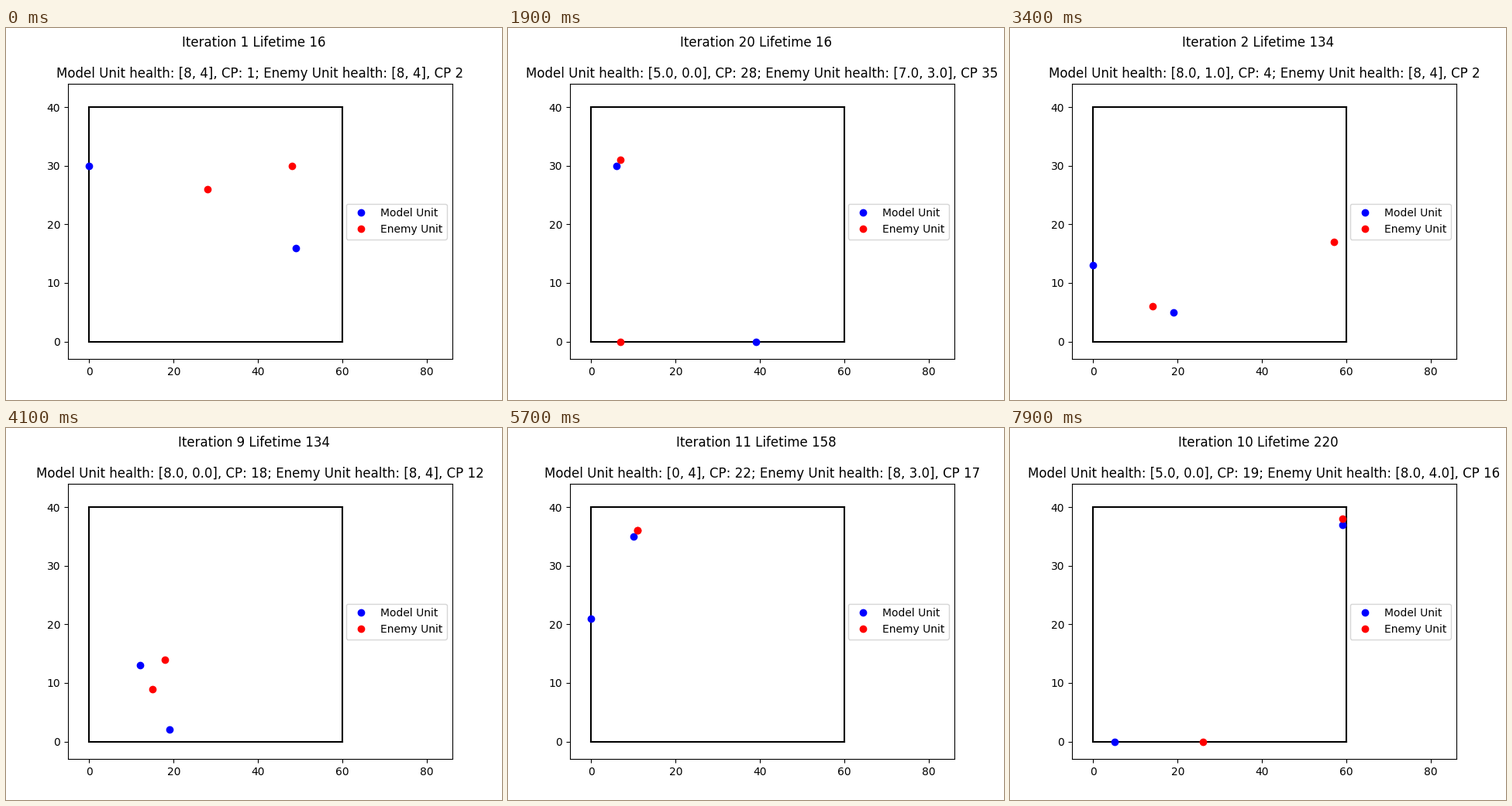
A matplotlib script for the animation above (8000 ms loop, 640 px wide and 480 px high).

```python
import numpy as np
import matplotlib.pyplot as plt
from matplotlib.animation import FuncAnimation

FRAMES, INTERVAL = 80, 100


class Episode:
    """One game: waypoints (turn, x, y) per unit, health steps, linear CP."""

    def __init__(self, start, lifetime, model, enemy, health, model_cp, enemy_cp):
        self.start, self.lifetime = start, lifetime
        self.model, self.enemy = model, enemy
        self.health = health
        self.model_cp, self.enemy_cp = model_cp, enemy_cp

    def titles(self, turn):
        _, own, foe = [h for h in self.health if h[0] <= turn][-1]
        own_cp, foe_cp = (score(cp, turn) for cp in (self.model_cp, self.enemy_cp))
        return (f"Iteration {turn} Lifetime {self.lifetime}",
                f"Model Unit health: {own}, CP: {own_cp}; "
                f"Enemy Unit health: {foe}, CP {foe_cp}")


def score(cp, turn):
    first, rate = cp
    return int(round(first + rate * (turn - 1)))


def place(path, turn):
    t, x, y = zip(*path)
    return np.rint(np.interp(turn, t, x)), np.rint(np.interp(turn, t, y))


def positions(paths, turn):
    return zip(*(place(p, turn) for p in paths))


opening = Episode(
    0, 16,
    model=[[(1, 0, 30), (4, 0, 30), (7, 6, 30)],
           [(1, 49, 16), (5, 49, 0), (7, 39, 0)]],
    enemy=[[(1, 28, 26), (2, 28, 31), (8, 7, 31)],
           [(1, 48, 30), (6, 48, 6), (8, 40, 1), (10, 40, 1), (11, 38, 0),
            (17, 7, 0), (20, 7, 0), (26, 7, 29)]],
    health=[(1, [8, 4], [8, 4]),
            (4, [8, 4], [8, 3.0]),
            (6, [8, 2.0], [8, 3.0]),
            (8, [7.0, 1.0], [7.0, 3.0]),
            (11, [6.0, 0.0], [7.0, 3.0]),
            (15, [5.0, 0.0], [7.0, 3.0]),
            (23, [4.0, 0.0], [7.0, 3.0]),
            (27, [2.0, 0.0], [6.0, 3.0]),
            (31, [1.0, 0.0], [6.0, 3.0])],
    model_cp=(1, 27 / 19), enemy_cp=(2, 33 / 19))

second = Episode(
    33, 134,
    model=[[(1, 0, 13), (2, 0, 13), (6, 12, 13)],
           [(1, 19, 5), (2, 19, 5), (5, 19, 2)]],
    enemy=[[(1, 14, 6), (2, 14, 6), (5, 18, 3), (7, 18, 3), (10, 13, 12)],
           [(1, 57, 17), (2, 57, 17), (10, 13, 14)]],
    health=[(1, [8, 4], [8, 4]),
            (2, [8.0, 1.0], [8, 4]),
            (6, [8.0, 0.0], [8, 4]),
            (10, [5.0, 0.0], [8, 4]),
            (12, [2.0, 0.0], [8, 4]),
            (14, [0.0, 0.0], [8, 4])],
    model_cp=(2, 2), enemy_cp=(1, 1.4))

third = Episode(
    47, 158,
    model=[[(1, 14, 21), (2, 14, 21), (5, 0, 21)],
           [(1, 10, 35), (13, 10, 35), (14, 10, 36)]],
    enemy=[[(1, 11, 36)],
           [(1, 5, 26), (2, 5, 26), (4, 5, 36), (6, 11, 36)]],
    health=[(1, [8, 4], [8, 4]),
            (2, [3.0, 4], [8, 4]),
            (5, [3.0, 4], [8, 3.0]),
            (9, [0, 4], [8, 3.0]),
            (13, [0, 3.0], [8, 3.0]),
            (16, [0, 2.0], [8.0, 3.0]),
            (20, [0, 1.0], [8.0, 3.0]),
            (23, [0, -1.0], [8.0, 3.0])],
    model_cp=(2, 2), enemy_cp=(1, 1.6))

last = Episode(
    70, 220,
    model=[[(1, 44, 37), (5, 59, 37)],
           [(1, 40, 9), (3, 34, 9), (5, 22, 0), (8, 5, 0)]],
    enemy=[[(1, 31, 38), (7, 59, 38)],
           [(1, 41, 19), (3, 41, 12), (6, 41, 0), (10, 26, 0)]],
    health=[(1, [6.0, 4], [8.0, 4]),
            (4, [6.0, 2.0], [8.0, 4]),
            (6, [6.0, 1.0], [8.0, 4.0]),
            (8, [5.0, 0.0], [8.0, 4.0])],
    model_cp=(1, 2), enemy_cp=(1, 15 / 9))

episodes = [opening, second, third, last]

fig, ax = plt.subplots(figsize=(6.4, 4.8), dpi=100)
fig.subplots_adjust(left=0.125, right=0.9, bottom=0.11, top=0.85)
ax.set(xlim=(-5, 86), ylim=(-3, 44))
for xs, ys in (((0, 0), (0, 40)), ((0, 60), (40, 40)),
               ((60, 60), (40, 0)), ((60, 0), (0, 0))):
    ax.plot(xs, ys, color="black")
model_dots, = ax.plot([], [], "bo", label="Model Unit")
enemy_dots, = ax.plot([], [], "ro", label="Enemy Unit")
ax.legend(loc="center right")
heading = fig.suptitle("")
status = ax.set_title("")


def draw(frame):
    ep = [e for e in episodes if e.start <= frame][-1]
    turn = frame - ep.start + 1
    model_dots.set_data(*positions(ep.model, turn))
    enemy_dots.set_data(*positions(ep.enemy, turn))
    top, sub = ep.titles(turn)
    heading.set_text(top)
    status.set_text(sub)
    return model_dots, enemy_dots, heading, status


anim = FuncAnimation(fig, draw, frames=FRAMES, interval=INTERVAL,
                     repeat=True, repeat_delay=0, blit=False)
plt.show()
```
